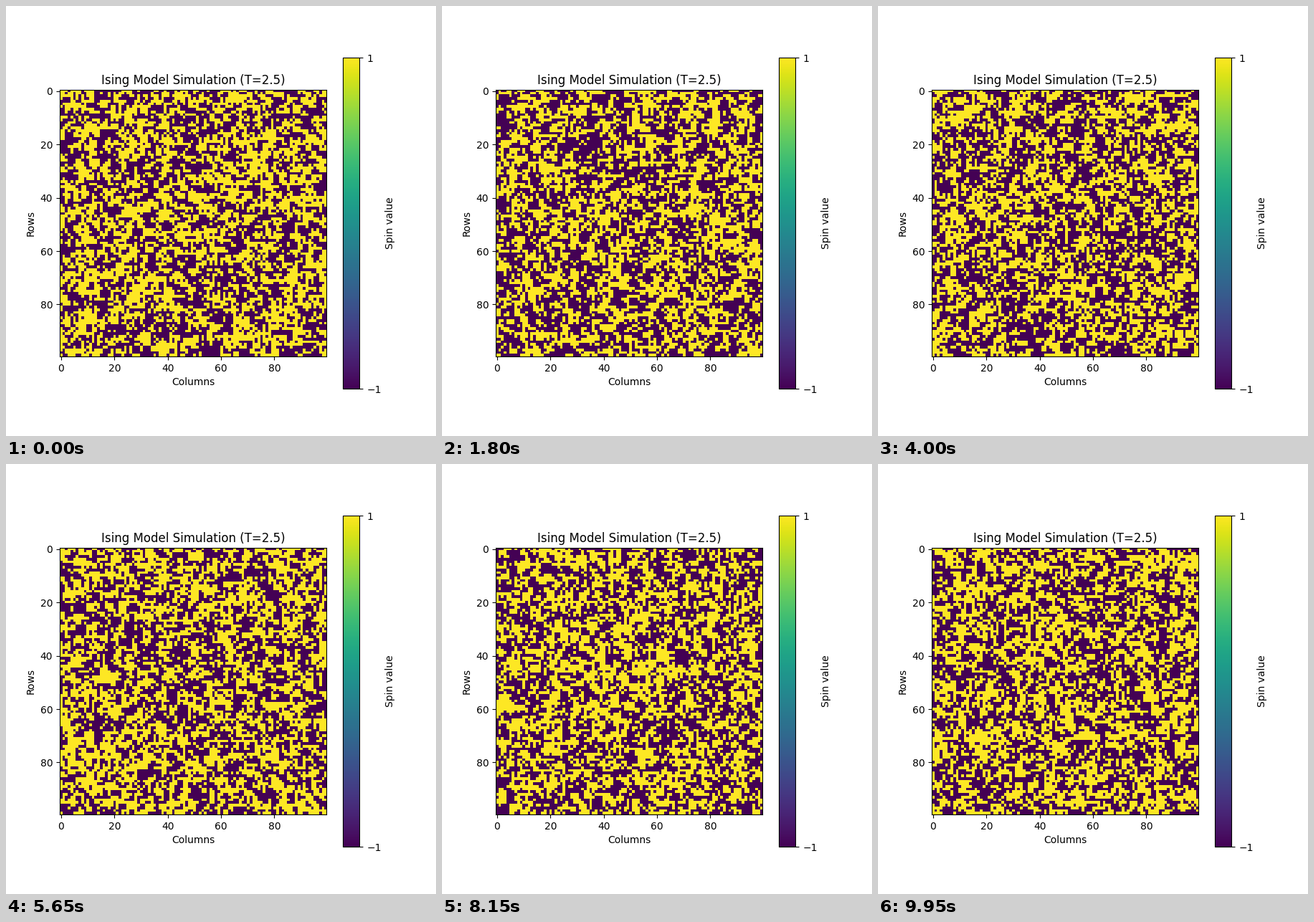
A matplotlib script that plays this animation: 600x600 px, repeating every 10 s.

```python
import numpy as np
import matplotlib.pyplot as plt
from matplotlib.animation import FuncAnimation

SIZE = 100
FRAMES = 200
INTERVAL = 50
TEMPERATURE = 2.5

rng = np.random.default_rng(7)
rows, cols = np.indices((SIZE, SIZE))
parity = (rows + cols) % 2


def sweep(spins):
    """Visit each site about once, one sublattice at a time."""
    for colour in (0, 1, 0, 1):
        neighbours = sum(np.roll(spins, step, axis)
                         for step in (-1, 1) for axis in (0, 1))
        cost = spins * neighbours
        accept = rng.random(spins.shape) < np.exp(-cost / TEMPERATURE)
        visited = rng.random(spins.shape) < 0.5
        spins = np.where(accept & visited & (parity == colour), -spins, spins)
    return spins


def simulate():
    spins = sweep(rng.choice([-1, 1], size=(SIZE, SIZE)))
    history = []
    for _ in range(FRAMES):
        spins = sweep(spins)
        history.append(spins)
    return history


history = simulate()

fig, ax = plt.subplots(figsize=(6, 6), dpi=100)
image = ax.imshow(history[0], cmap="viridis", vmin=-1, vmax=1,
                  interpolation="nearest")
ax.set_title(f"Ising Model Simulation (T={TEMPERATURE})")
ax.set_xlabel("Columns")
ax.set_ylabel("Rows")
fig.colorbar(image, ax=ax, ticks=[-1, 1], label="Spin value")


def update(frame):
    image.set_data(history[frame])
    return [image]


anim = FuncAnimation(fig, update, frames=FRAMES, interval=INTERVAL,
                     repeat=True, repeat_delay=0, blit=False)
plt.show()
```
